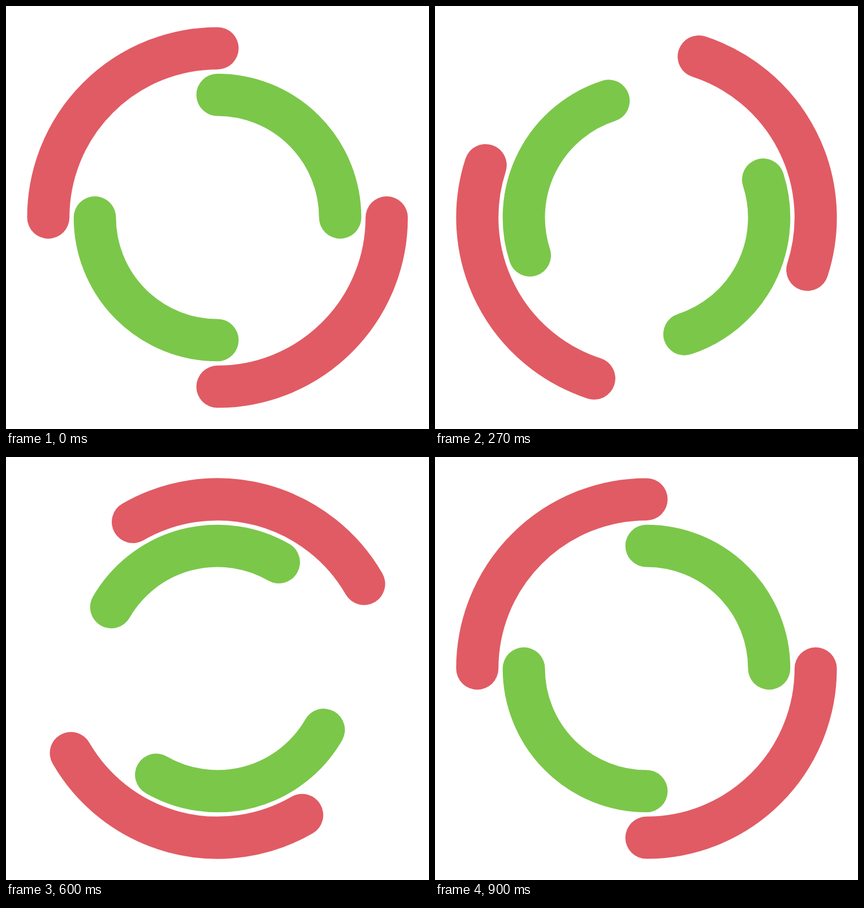
An HTML page that plays this animation: 748 by 748 pixels, repeating every 0.93 s.

```html
<!DOCTYPE html>
<html lang="en">
<head>
<meta charset="utf-8">
<title>Double ring spinner</title>
<style>
  html, body { margin: 0; width: 100%; height: 100%; overflow: hidden; background: #fff; }
  svg { display: block; width: 100%; height: 100%; }
  path { fill: none; stroke-width: 10; stroke-linecap: round; }
</style>
</head>
<body>
<svg viewBox="-50 -50 100 100">
  <path id="outer" stroke="#e15b64" d="M-40 0A40 40 0 0 1 0-40M40 0A40 40 0 0 1 0 40"/>
  <path id="inner" stroke="#7bc74a" d="M0-29A29 29 0 0 1 29 0M0 29A29 29 0 0 1-29 0"/>
</svg>
<script>
  const LOOP = 930, STEP = 30, DEGREES = 12;
  const outer = document.getElementById('outer');
  const inner = document.getElementById('inner');

  function draw() {
    const step = Math.floor(performance.now() % LOOP / STEP);
    const angle = step * DEGREES;
    outer.setAttribute('transform', `rotate(${angle})`);
    inner.setAttribute('transform', `rotate(${-angle})`);
    requestAnimationFrame(draw);
  }
  draw();
</script>
</body>
</html>
```
